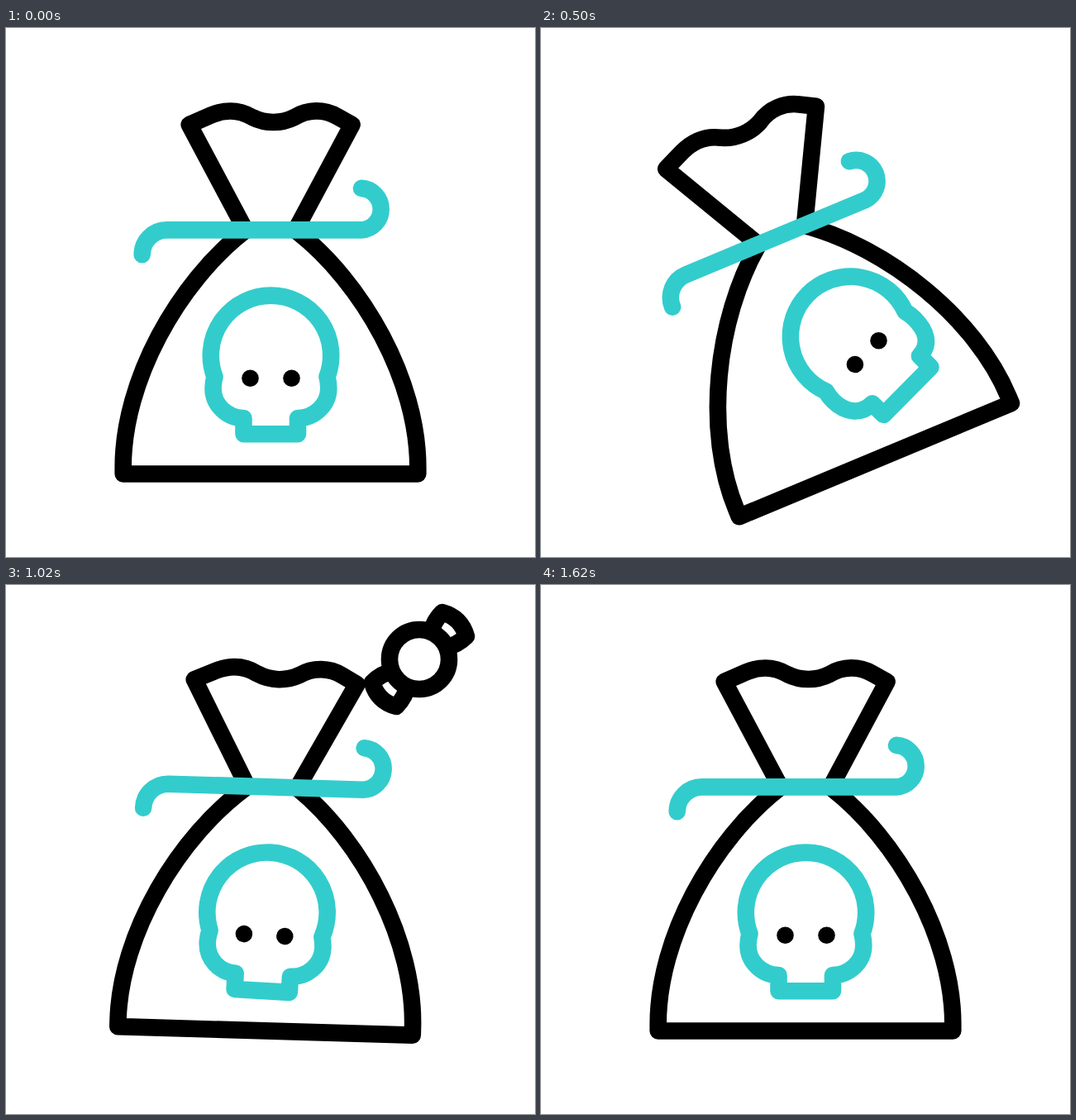
Write an HTML page that moves like this. It is 640x640 px and loops after 1900 ms.

```html
<!DOCTYPE html>
<html lang="en">
<head>
<meta charset="utf-8">
<title>Skull bag</title>
<style>
  html, body { margin: 0; width: 100%; height: 100%; overflow: hidden; background: #fff; }
  svg { display: block; width: 100vw; height: 100vh; }
  .line { fill: none; stroke: #000; stroke-width: 20.6; stroke-linecap: round; stroke-linejoin: round; }
  .solid { fill: #fff; }
  .teal { stroke: #3cc; }
</style>
</head>
<body>
<svg viewBox="0 0 640 640">
  <defs>
    <clipPath id="outside">
      <path id="mask" d="M-600 117H221.7L248 105.5C265 98.5 282 98.5 298 108C314 116 333 116 349 108C365 98 385 98 400.5 107L418.6 117L350.6 244L1400 900V-900H-600Z"/>
    </clipPath>
  </defs>
  <g clip-path="url(#outside)">
    <g id="candy" class="line">
      <path id="wing" d="M32 12Q44 20.5 60 20.5Q71.6 0 60 -20.5Q44 -20.5 32 -12"/>
      <use href="#wing" transform="rotate(180)"/>
      <circle r="36" class="solid"/>
    </g>
  </g>
  <g id="bag">
    <path class="line solid" d="M289.4 244L221.7 117L248 105.5C265 98.5 282 98.5 298 108C314 116 333 116 349 108C365 98 385 98 400.5 107L418.6 117L350.6 244"/>
    <path class="line solid" d="M289.4 245C208 308 141.7 427 141.7 531V539.5H498.3V531C498.3 427 432 308 350.6 245"/>
    <path class="line teal" d="M164.7 274.3A30 30 0 0 1 194.7 244.4H430a25.3 25.3 0 0 0 0 -50.5"/>
  </g>
  <g id="skull">
    <path id="head" class="line teal"/>
    <circle id="eyeL" cy="423.8" r="10.3"/>
    <circle id="eyeR" cy="423.8" r="10.3"/>
  </g>
</svg>
<script>
const LOOP = 1900, STEP = 20;
const $ = id => document.getElementById(id);

// Each track is a list of [time, value], eased in and out between keys.
const swing = [[0, 0], [460, -24], [800, 12], [1201, -6], [1620, 0]];
const turn = (right, left) => [[0, 0], [340, right], [720, left], [1070, 0]];
const eyeLeft = turn(25, -27.5);
const eyeRight = turn(15.5, -36.8);
const jawLeft = turn(0, -15.7);
const jawRight = turn(15.5, 0);

function at(track, t) {
  for (let i = 1; i < track.length; i++) {
    const [t0, a] = track[i - 1], [t1, b] = track[i];
    if (t < t1) {
      const u = (t - t0) / (t1 - t0);
      return a + (b - a) * u * u * (3 - 2 * u);
    }
  }
  return track[track.length - 1][1];
}

function headPath(left, right) {
  const l = 287.5 + left, r = 353 + right;
  return `M252.5 422A72.7 72.7 0 1 1 388.5 422C389.8 427 390.3 431 390.3 436` +
    `C390.3 456 ${r + 20} 472 ${r} 472V491.2H${l}V472` +
    `C${l - 20} 472 250.5 456 250.5 436C250.5 431 251 427 252.5 422Z`;
}

function draw(t) {
  const angle = at(swing, t);
  const spin = `rotate(${angle} 320 320)`;
  $('bag').setAttribute('transform', spin);
  $('mask').setAttribute('transform', spin);
  $('skull').setAttribute('transform', `rotate(${2 * angle} 320 320)`);
  $('head').setAttribute('d', headPath(at(jawLeft, t), at(jawRight, t)));
  $('eyeL').setAttribute('cx', 295.5 + at(eyeLeft, t));
  $('eyeR').setAttribute('cx', 345.5 + at(eyeRight, t));

  // The candy is thrown out of the bag's mouth along an arc.
  const s = t - 1020;
  const x = 500 + 0.677 * s + 0.00038 * s * s;
  const y = 90 + 0.3804 * s + 0.0026875 * s * s;
  $('candy').setAttribute('transform', `translate(${x} ${y}) rotate(-45)`);
  $('candy').setAttribute('visibility', t >= 740 && t < 1300 ? 'visible' : 'hidden');
}

const start = performance.now();
function tick() {
  const t = (performance.now() - start) % LOOP;
  draw(Math.floor(t / STEP) * STEP);
  requestAnimationFrame(tick);
}
tick();
</script>
</body>
</html>
```
